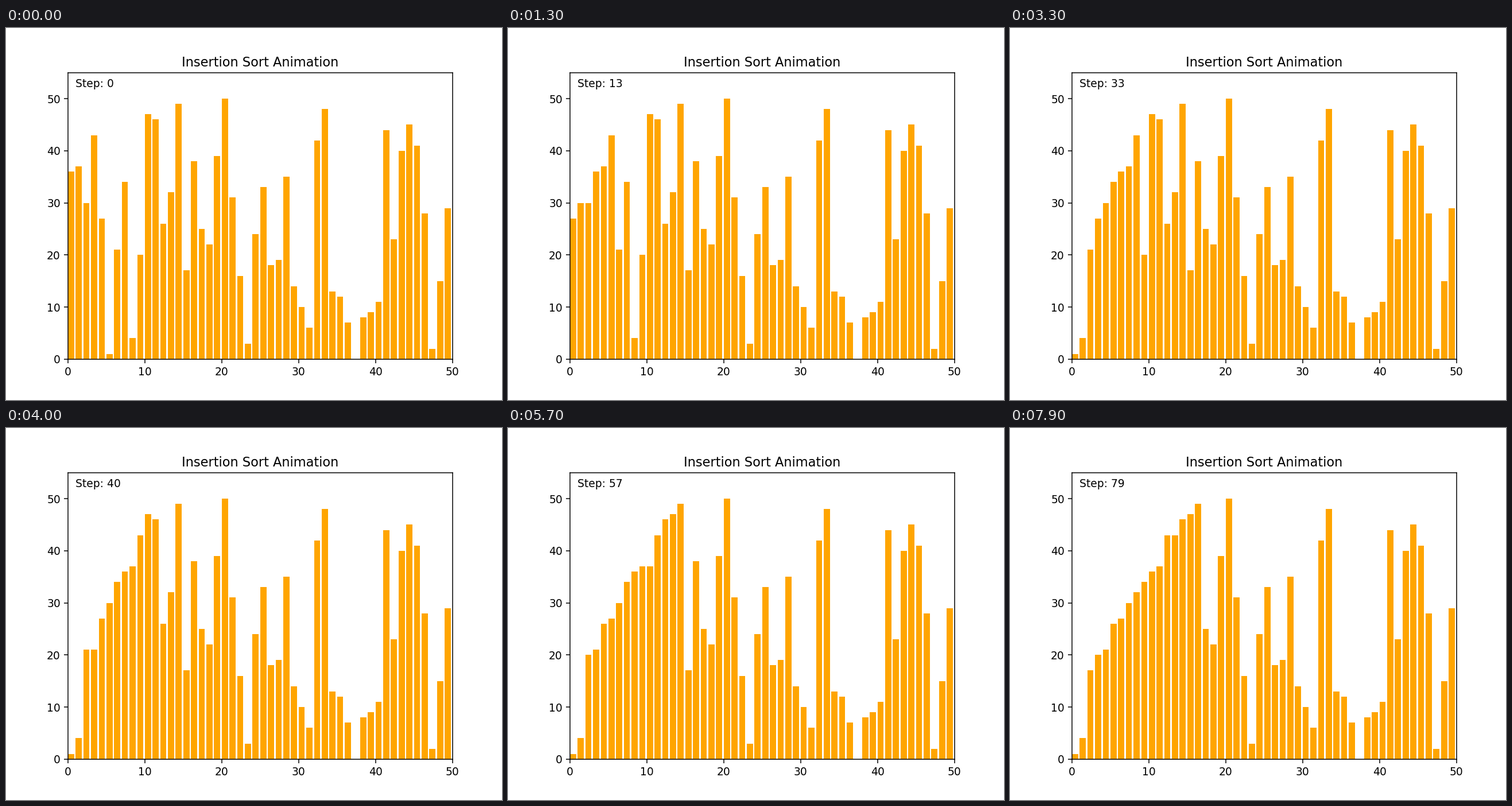
Recreate the animation shown at these times as a matplotlib script. Size 864x648 px, loop 8000 ms.

```python
import matplotlib.pyplot as plt
from matplotlib.animation import FuncAnimation

STEPS = 80
INTERVAL = 100  # ms

VALUES = [
    36, 37, 30, 43, 27, 1, 21, 34, 4, 20,
    47, 46, 26, 32, 49, 17, 38, 25, 22, 39,
    50, 31, 16, 3, 24, 33, 18, 19, 35, 14,
    10, 6, 42, 48, 13, 12, 7, 0, 8, 9,
    11, 44, 23, 40, 45, 41, 28, 2, 15, 29,
]


def insertion_sort(values):
    """Yield the list after every shift and every placement."""
    a = list(values)
    for i in range(1, len(a)):
        key, j = a[i], i
        while j > 0 and a[j - 1] > key:
            a[j] = a[j - 1]
            j -= 1
            yield a[:]
        a[j] = key
        yield a[:]


states = [state for _, state in zip(range(STEPS), insertion_sort(VALUES))]

plt.rcParams["font.family"] = "DejaVu Sans"
fig, ax = plt.subplots(figsize=(6.4, 4.8), dpi=135)
ax.set_title("Insertion Sort Animation")
bars = ax.bar(range(len(VALUES)), VALUES, width=0.8, align="edge", color="orange")
ax.set_xlim(0, len(VALUES))
ax.set_ylim(0, 55)
label = ax.text(0.02, 0.95, "Step: 0", transform=ax.transAxes)


def update(step):
    for bar, height in zip(bars, states[step]):
        bar.set_height(height)
    label.set_text(f"Step: {step}")
    return [*bars, label]


anim = FuncAnimation(fig, update, frames=STEPS, interval=INTERVAL,
                     repeat=True, repeat_delay=0, blit=False)
plt.show()
```
